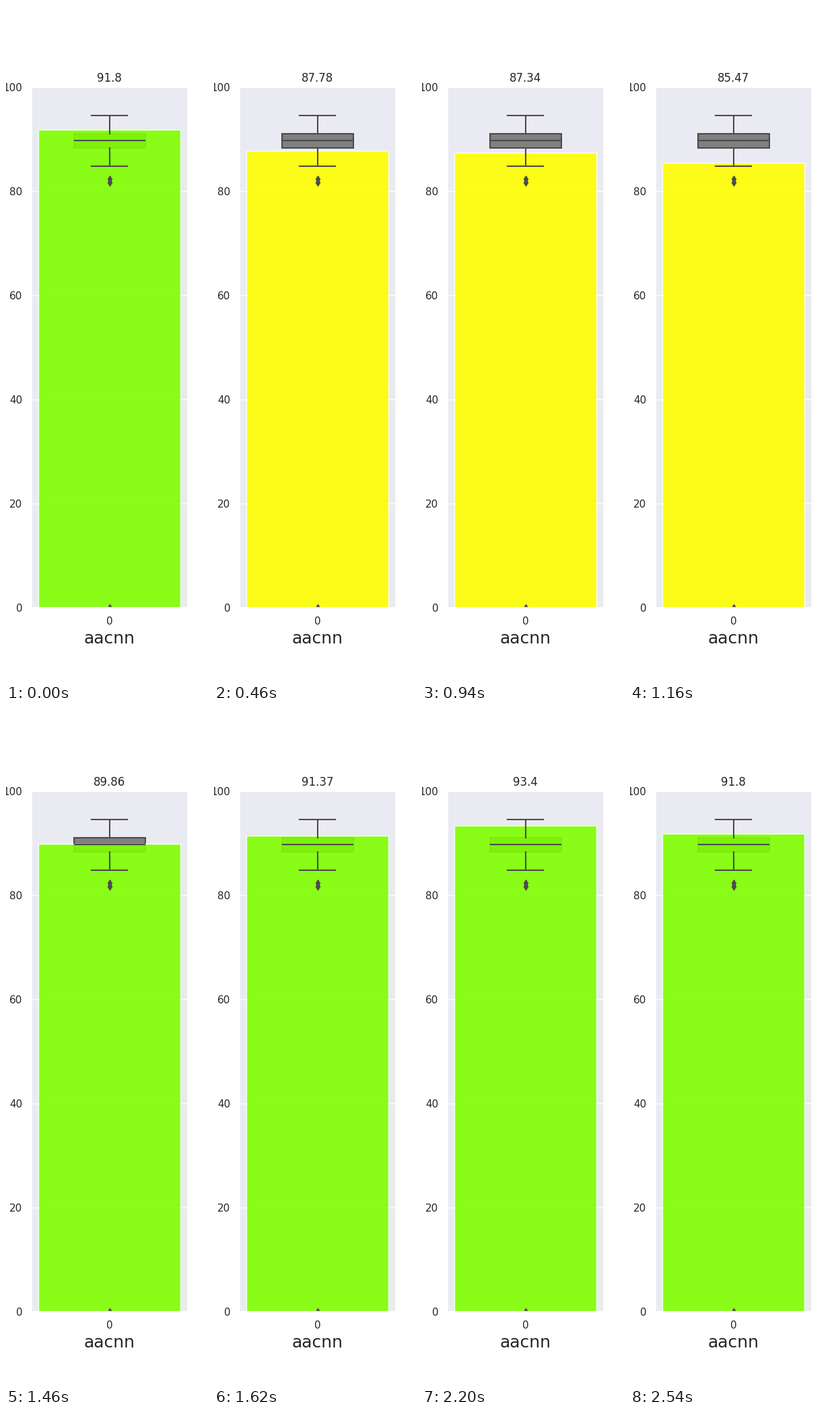
These frames come from a looping animation (300 px wide and 1000 px high, 2.56 s). A matplotlib script:

```python
import numpy as np
import matplotlib.pyplot as plt
from matplotlib.animation import FuncAnimation

INK, DARK, PANEL = "0.15", "#4c4c4c", "#EAEAF2"
GOOD_LEVEL = 89

plt.rcParams.update({
    "font.family": "DejaVu Sans",
    "text.color": INK,
    "axes.labelcolor": INK,
    "axes.facecolor": PANEL,
    "axes.edgecolor": "white",
    "axes.linewidth": 1.25,
    "axes.axisbelow": True,
})

accuracy = [
    91.8, 89.35, 90.42, 88.61, 92.13, 90.07, 86.92, 91.26,
    89.52, 93.4, 88.74, 87.78, 90.63, 89.21, 91.55, 88.12,
    90.18, 92.79, 89.97, 86.15, 90.85, 88.47, 91.37, 87.34,
    90.31, 89.08, 89.86, 94.55, 88.95, 90.74, 85.47, 89.64,
]

# Every fourth value rests for five ticks; the run then plays backwards.
ticks = [5 if i % 4 == 2 else 1 for i in range(len(accuracy))]
forward = np.repeat(np.arange(len(accuracy)), ticks)
sequence = np.concatenate([forward, forward[::-1]])

fig, ax = plt.subplots(figsize=(3, 10), dpi=100)
fig.subplots_adjust(left=0.125, right=0.9, bottom=0.11, top=0.88)

line = dict(color=DARK, linewidth=1.5)
stats = dict(med=89.76, q1=88.3, q3=91.07, whislo=84.8, whishi=94.58,
             fliers=[82.3, 81.75, 0])
ax.bxp(
    [stats], positions=[0], widths=0.4, capwidths=0.2, patch_artist=True,
    manage_ticks=False,
    boxprops=dict(facecolor="#808080", edgecolor=DARK, linewidth=1.5, zorder=1),
    medianprops=dict(line, zorder=2),
    whiskerprops=dict(line, zorder=2),
    capprops=dict(line, zorder=2),
    flierprops=dict(marker="d", markersize=5, linestyle="none", zorder=2,
                    markerfacecolor=DARK, markeredgecolor=DARK),
)
bar = ax.bar(0, accuracy[0], width=0.8, alpha=0.9, edgecolor="white",
             linewidth=1, zorder=1.1)[0]

ax.set_xlim(-0.44, 0.44)
ax.set_ylim(0, 100)
ax.set_xticks([0])
ax.set_yticks(range(0, 101, 20))
ax.grid(axis="y", color="white", linewidth=1)
ax.tick_params(length=0, pad=9.5, labelsize=11, labelcolor=INK)
ax.set_xlabel("aacnn", fontsize=18)
title = ax.set_title("", fontsize=12)


def update(frame):
    value = accuracy[sequence[frame]]
    bar.set_height(value)
    bar.set_facecolor("chartreuse" if value > GOOD_LEVEL else "yellow")
    title.set_text(str(value))
    return bar, title


anim = FuncAnimation(fig, update, frames=len(sequence), interval=20,
                     repeat=True, repeat_delay=0, blit=False)
plt.show()
```
